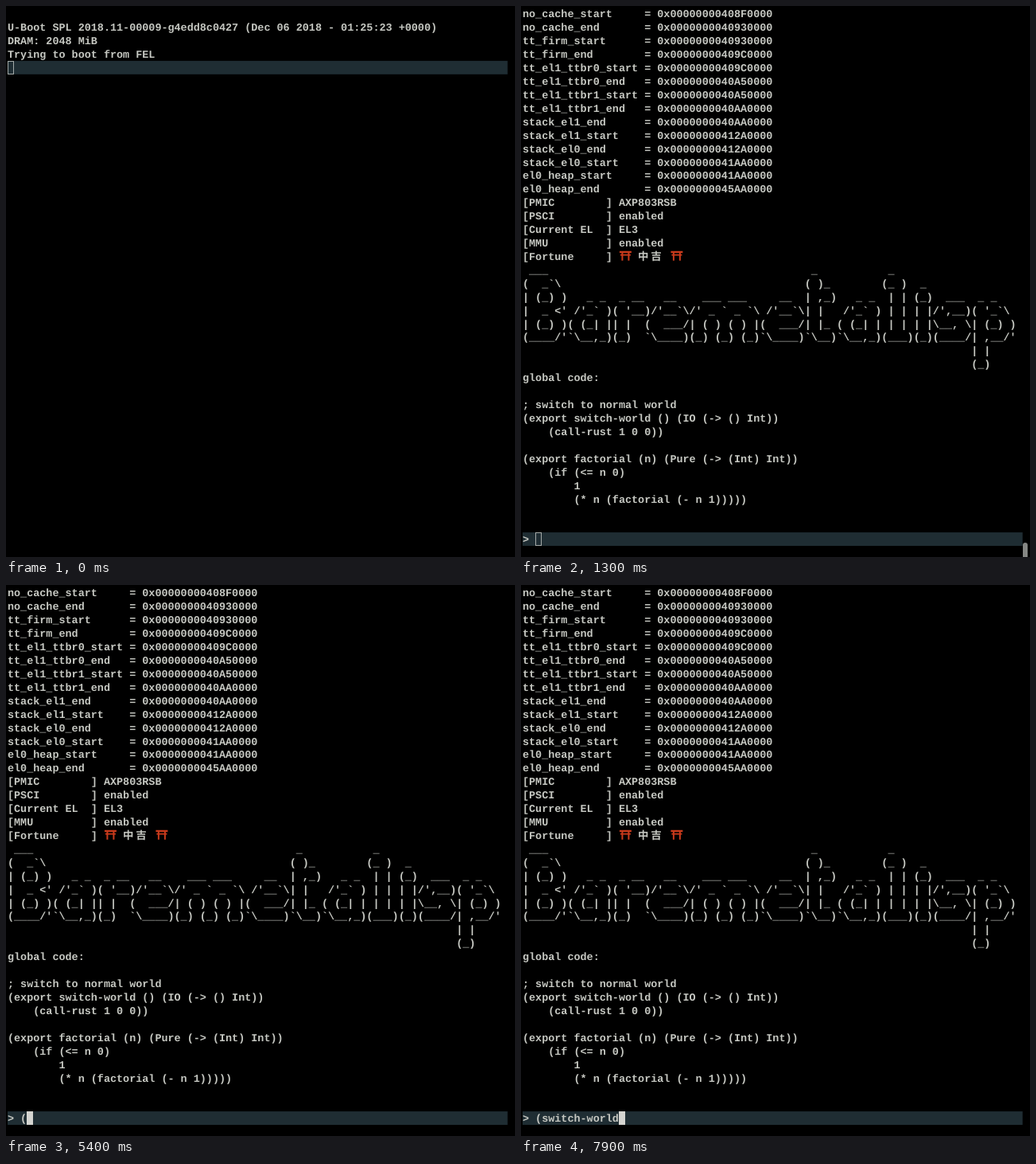
These frames come from a looping animation (640x692 px, 8 s). An HTML page with a canvas:

```html
<!DOCTYPE html>
<html lang="en">
<head>
<meta charset="utf-8">
<title>Serial console</title>
<style>
html, body { margin: 0; height: 100%; overflow: hidden; background: #000; }
canvas { display: block; }
</style>
</head>
<body>
<canvas id="stage" width="640" height="692"></canvas>
<script type="text/plain" id="log">
U-Boot SPL 2018.11-00009-g4edd8c0427 (Dec 06 2018 - 01:25:23 +0000)
DRAM: 2048 MiB
Trying to boot from FEL
�rom_start          = 0x0000000000000000
rom_end            = 0x0000000000010000
sram_start         = 0x0000000000010000
sram_end           = 0x0000000000054000
DEVICE_MEM_START   = 0x0000000001000000
DEVICE_MEM_END     = 0x0000000002000000
__ram_start        = 0x0000000040080000
__data_start       = 0x00000000400D0000
__data_end         = 0x00000000400D0038
__bss_start        = 0x00000000400E0000
__stack_firm_end   = 0x00000000400F0000
__stack_firm_start = 0x00000000408F0000
no_cache_start     = 0x00000000408F0000
no_cache_end       = 0x0000000040930000
tt_firm_start      = 0x0000000040930000
tt_firm_end        = 0x00000000409C0000
tt_el1_ttbr0_start = 0x00000000409C0000
tt_el1_ttbr0_end   = 0x0000000040A50000
tt_el1_ttbr1_start = 0x0000000040A50000
tt_el1_ttbr1_end   = 0x0000000040AA0000
stack_el1_end      = 0x0000000040AA0000
stack_el1_start    = 0x00000000412A0000
stack_el0_end      = 0x00000000412A0000
stack_el0_start    = 0x0000000041AA0000
el0_heap_start     = 0x0000000041AA0000
el0_heap_end       = 0x0000000045AA0000
[PMIC        ] AXP803RSB
[PSCI        ] enabled
[Current EL  ] EL3
[MMU         ] enabled
[Fortune     ] ⛩  中 吉  ⛩
 ___                                         _           _
(  _`\                                      ( )_        (_ )  _
| (_) )   _ _  _ __   __    ___ ___     __  | ,_)   _ _  | | (_)  ___  _ _
|  _ <' /'_` )( '__)/'__`\/' _ ` _ `\ /'__`\| |   /'_` ) | | | |/',__)( '_`\
| (_) )( (_| || |  (  ___/| ( ) ( ) |(  ___/| |_ ( (_| | | | | |\__, \| (_) )
(____/'`\__,_)(_)  `\____)(_) (_) (_)`\____)`\__)`\__,_)(___)(_)(____/| ,__/'
                                                                      | |
                                                                      (_)
global code:

; switch to normal world
(export switch-world () (IO (-> () Int))
    (call-rust 1 0 0))

(export factorial (n) (Pure (-> (Int) Int))
    (if (<= n 0)
        1
        (* n (factorial (- n 1)))))

</script>
<script>
const LOOP = 8000, CELL = 8.06, ROW = 16.92, LEFT = 2, TOP = 1.2;
const TEXT = '#c6c8c2', BAR = '#1f2d33', PALE = '#d4d4d0';
const TYPED = '(switch-world';
const FAMILY = '"Liberation Mono", "Noto Sans CJK JP", monospace';

const log = document.getElementById('log').textContent.split('\n');
const ctx = document.getElementById('stage').getContext('2d');
const colX = col => LEFT + col * CELL;
const rowY = row => TOP + row * ROW;

// Pick the font size whose advance equals one cell.
ctx.font = `bold 100px ${FAMILY}`;
const size = 100 * CELL / ctx.measureText('0').width;

const arrow = new Path2D('M0 0V11.5L2.8 9 4.6 13 6.8 12 5 8.2H8.5Z');
const beam = new Path2D('M-3-6.5Q0-6.5 0-4Q0-6.5 3-6.5M0-4V4M-3 6.5Q0 6.5 0 4Q0 6.5 3 6.5M-2 0H2');

function torii(x, y) {
  ctx.fillStyle = '#c83a1c';
  ctx.fillRect(x + 1, y + 2, 15, 2.4);
  ctx.fillRect(x + 2, y + 6, 13, 1.8);
  ctx.fillRect(x + 3.5, y + 4, 2, 10);
  ctx.fillRect(x + 11.5, y + 4, 2, 10);
  ctx.fillStyle = TEXT;
}

function badByte(x, y) {
  ctx.fill(new Path2D(`M${x + 4} ${y + 1}l5 7-5 7-5-7z`));
  ctx.save();
  ctx.fillStyle = '#000';
  ctx.font = `bold 9px ${FAMILY}`;
  ctx.fillText('?', x + 1.4, y + 11);
  ctx.restore();
}

function print(line, row) {
  const y = rowY(row);
  [...line].forEach((ch, col) => {
    const x = colX(col);
    if (ch === '⛩') torii(x, y);
    else if (ch === '\uFFFD') badByte(x, y);
    else if (ch !== ' ') ctx.fillText(ch, x, y + 13.2);
  });
}

function promptBar(row) {
  ctx.fillStyle = BAR;
  ctx.fillRect(LEFT, rowY(row), 78 * CELL, ROW);
}

function caret(col, row, focused) {
  const x = Math.round(colX(col)), y = Math.round(rowY(row));
  ctx.fillStyle = PALE;
  ctx.strokeStyle = '#a4aaa8';
  ctx.lineWidth = 1;
  if (focused) ctx.fillRect(x, y, 8, 17);
  else ctx.strokeRect(x + .5, y + .5, 7, 16);
}

function pointer(t) {
  const p = Math.min(1, Math.max(0, (t - 3000) / 1400));
  const k = p * p * (3 - 2 * p);
  ctx.save();
  ctx.translate(381 + 195 * k, 617 + 23 * k);
  ctx.strokeStyle = PALE;
  if (t < 3600) {
    ctx.lineWidth = 1.2;
    ctx.fillStyle = '#000';
    ctx.fill(arrow);
    ctx.stroke(arrow);
  } else {
    ctx.lineWidth = 3;
    ctx.stroke(beam);
    ctx.strokeStyle = '#000';
    ctx.lineWidth = 1;
    ctx.stroke(beam);
  }
  ctx.restore();
}

function draw(t) {
  ctx.fillStyle = '#000';
  ctx.fillRect(0, 0, 640, 692);
  ctx.font = `bold ${size}px ${FAMILY}`;
  ctx.textRendering = 'geometricPrecision';

  const ready = t >= 1300;
  const first = ready ? 16 : 0;
  const last = ready ? 55 : t >= 1200 ? 30 : 4;
  const row = last - first;
  const count = Math.min(TYPED.length, Math.max(0, Math.floor((t - 5150) / 210)));

  promptBar(row);
  ctx.fillStyle = TEXT;
  log.slice(first, last).forEach(print);
  if (ready) print('> ' + TYPED.slice(0, count), row);
  caret(ready ? 2 + count : 0, row, t >= 4400);

  if (ready && t < 2300) {
    ctx.fillStyle = '#858784';
    ctx.beginPath();
    ctx.roundRect(631, 674, 6, 20, 3);
    ctx.fill();
  }
  if (t >= 2800 && t < 5200) pointer(t);
}

const start = performance.now();
function tick() {
  draw((performance.now() - start) % LOOP);
  requestAnimationFrame(tick);
}
tick();
</script>
</body>
</html>
```
